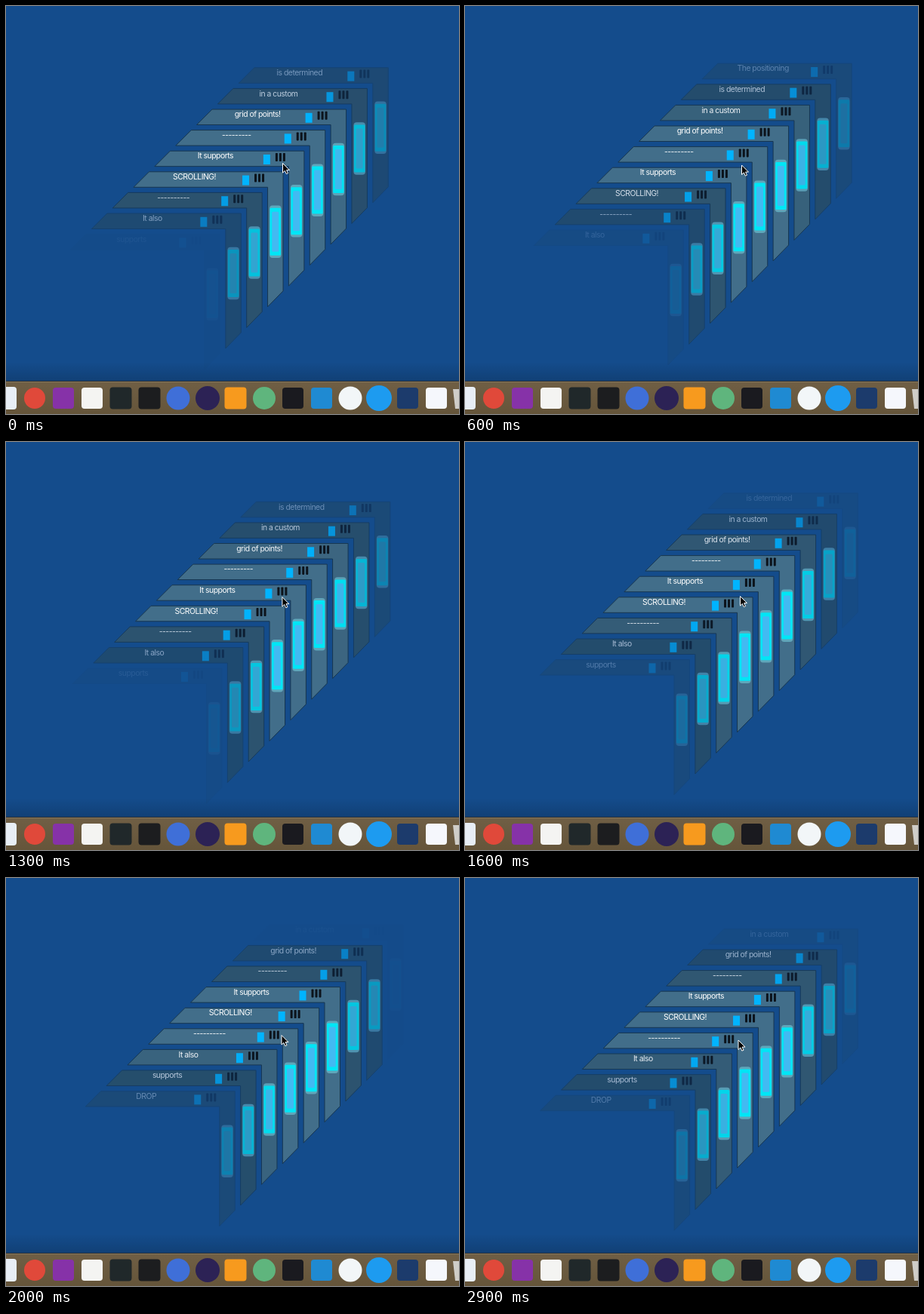
These frames come from a looping animation (600x541 px, 3000 ms). An HTML page:

```html
<!DOCTYPE html>
<html lang="en">
<head>
<meta charset="utf-8">
<title>Diagonal card list</title>
<style>
  html, body { margin: 0; width: 100%; height: 100%; overflow: hidden; background: #144c8c; }
  svg { display: block; width: 600px; height: 541px; }
  text { font: 10.4px Inter, Roboto, sans-serif; letter-spacing: -.5px; fill: #fff; text-anchor: middle; }
</style>
</head>
<body>
<svg viewBox="0 0 600 541" xmlns="http://www.w3.org/2000/svg">
  <defs>
    <linearGradient id="wood" x2="0" y2="1">
      <stop offset="0" stop-color="#705f45"/>
      <stop offset="1" stop-color="#65553a"/>
    </linearGradient>
    <linearGradient id="shade" x2="0" y2="1">
      <stop offset="0" stop-color="#000" stop-opacity="0"/>
      <stop offset="1" stop-color="#000" stop-opacity=".16"/>
    </linearGradient>
  </defs>
  <rect width="600" height="541" fill="#144c8c"/>
  <g id="cards"></g>
  <rect y="472" width="600" height="25" fill="url(#shade)"/>
  <rect y="497" width="600" height="44" fill="url(#wood)"/>
  <rect y="497" width="600" height="1" fill="#2b3038"/>
  <rect y="498" width="600" height="1" fill="#877759"/>
  <g id="dock"></g>
  <path id="cursor" d="M0 0V12.6L2.9 9.9L4.8 14.2L7 13.2L5.1 9.1H9Z" fill="#000" stroke="#fff" stroke-width="1" stroke-linejoin="round"/>
</svg>
<script>
const LOOP = 3000, STEP = 100;
const LABELS = ['The positioning', 'is determined', 'in a custom', 'grid of points!', '---------',
  'It supports', 'SCROLLING!', '----------', 'It also', 'supports', 'DROP'];

// time, scroll offset, cursor x, cursor y
const KEYS = [
  [0, 0, 366.5, 208.5],
  [600, -22, 366.5, 211],
  [900, -10, 368, 208.5],
  [1600, 14, 364.5, 204.5],
  [2000, 47.6, 365, 208.5],
  [2400, 53.6, 365.5, 208.5],
  [2900, 42, 362, 215]
];

// card right edge, opacity
const FADE = [[281, 0], [310, .45], [338, .76], [366, 1], [448, 1], [478, .72], [506, .42], [527, 0]];

// shape, centre x, radius, colour
const DOCK = [
  ['s', -1, 15, '#e8eef5'], ['c', 38, 14, '#e0493a'], ['s', 76, 14, '#8632a8'],
  ['s', 114, 14, '#f4f4f2'], ['s', 152, 14.5, '#20282a'], ['s', 190, 14.5, '#1c1d1f'],
  ['c', 228, 15.5, '#3f6fd8'], ['c', 267, 16, '#2c2255'], ['s', 304, 14.5, '#f79a1e'],
  ['c', 342, 15, '#5fb57d'], ['s', 380, 14, '#1a1a1f'], ['s', 418, 14, '#1f8ad2'],
  ['c', 456, 15.5, '#f2f6f8'], ['c', 494, 17, '#1d9bf0'], ['s', 532, 14, '#1c3b6c'],
  ['s', 570, 14, '#f5f7fc']
];

const $ = id => document.getElementById(id);
const rect = (x, y, w, h, fill, r = 0) =>
  `<rect x="${x}" y="${y}" width="${w}" height="${h}" rx="${r}" fill="${fill}"/>`;

// Each card is drawn from its top right corner.
const card = label => `<g>
  <path d="M0 0V158L-20.5 179V20.5H-198L-177.5 0Z" stroke="#17364f" stroke-width="1"/>
  <text x="-117.5" y="10.3">${label}</text>
  ${rect(-54, 4.8, 9, 13, '#00b4ff')}
  ${[-38, -33, -28].map(x => rect(x, 2.8, 3, 11, '#0c131b', .8)).join('')}
  ${rect(-18, 44.8, 15.5, 69.5, '#5fa6ba', 4)}
  ${rect(-17.5, 48, 14.5, 63, '#00e6f6', 1.5)}
  ${rect(-14.8, 53, 9, 53, '#42baf2', 1.5)}
</g>`;

$('cards').innerHTML = LABELS.map(card).join('');
$('dock').innerHTML = DOCK.map(([kind, x, r, fill]) =>
  rect(x - r, 520 - r, 2 * r, 2 * r, fill, kind === 'c' ? r : 4)).join('') +
  '<path d="M592 508H612V534H595Z" fill="#cfcdc8"/>';

const cards = [...$('cards').children];

function lerp(table, x) {
  let i = 0;
  if (x <= table[0][0] || x >= table[table.length - 1][0]) return 0;
  while (x > table[i + 1][0]) i++;
  const [x0, y0] = table[i], [x1, y1] = table[i + 1];
  return y0 + (y1 - y0) * (x - x0) / (x1 - x0);
}

const mix = (from, to, k) => `rgb(${from.map((c, i) => Math.round(c + (to[i] - c) * k))})`;
const slope = (i, c) => (KEYS[i + 1][c] - KEYS[i][c]) / (KEYS[i + 1][0] - KEYS[i][0]);

// Monotone tangent, flat where the direction turns.
function tangent(i, c) {
  if (i === 0) return slope(0, c);
  if (i === KEYS.length - 1) return slope(i - 1, c);
  const a = slope(i - 1, c), b = slope(i, c);
  return a * b > 0 ? 2 * a * b / (a + b) : 0;
}

function track(t, c) {
  let i = 0;
  while (i < KEYS.length - 2 && t > KEYS[i + 1][0]) i++;
  const d = KEYS[i + 1][0] - KEYS[i][0], u = Math.min(1, (t - KEYS[i][0]) / d), v = 1 - u;
  return KEYS[i][c] * (1 + 2 * u) * v * v + KEYS[i + 1][c] * u * u * (3 - 2 * u)
    + d * u * v * (v * tangent(i, c) - u * tangent(i + 1, c));
}

function draw(t) {
  const scroll = track(t, 1);
  cards.forEach((el, i) => {
    const x = 506.3 + scroll - 27.85 * (i - 1);
    const y = 81.8 - scroll + 27.6 * (i - 1);
    const a = lerp(FADE, x);
    el.setAttribute('transform', `translate(${x.toFixed(2)} ${y.toFixed(2)})`);
    el.setAttribute('opacity', a.toFixed(3));
    // Faded cards also lose brightness.
    el.firstElementChild.setAttribute('fill', mix([41, 70, 82], [66, 110, 138], a ** 4));
    el.lastElementChild.setAttribute('fill', mix([48, 200, 212], [66, 186, 242], a ** 2));
  });
  $('cursor').setAttribute('transform', `translate(${track(t, 2)} ${track(t, 3)})`);
}

function frame() {
  const t = performance.now() % LOOP;
  draw(Math.floor(t / STEP) * STEP);
  requestAnimationFrame(frame);
}
frame();
</script>
</body>
</html>
```
